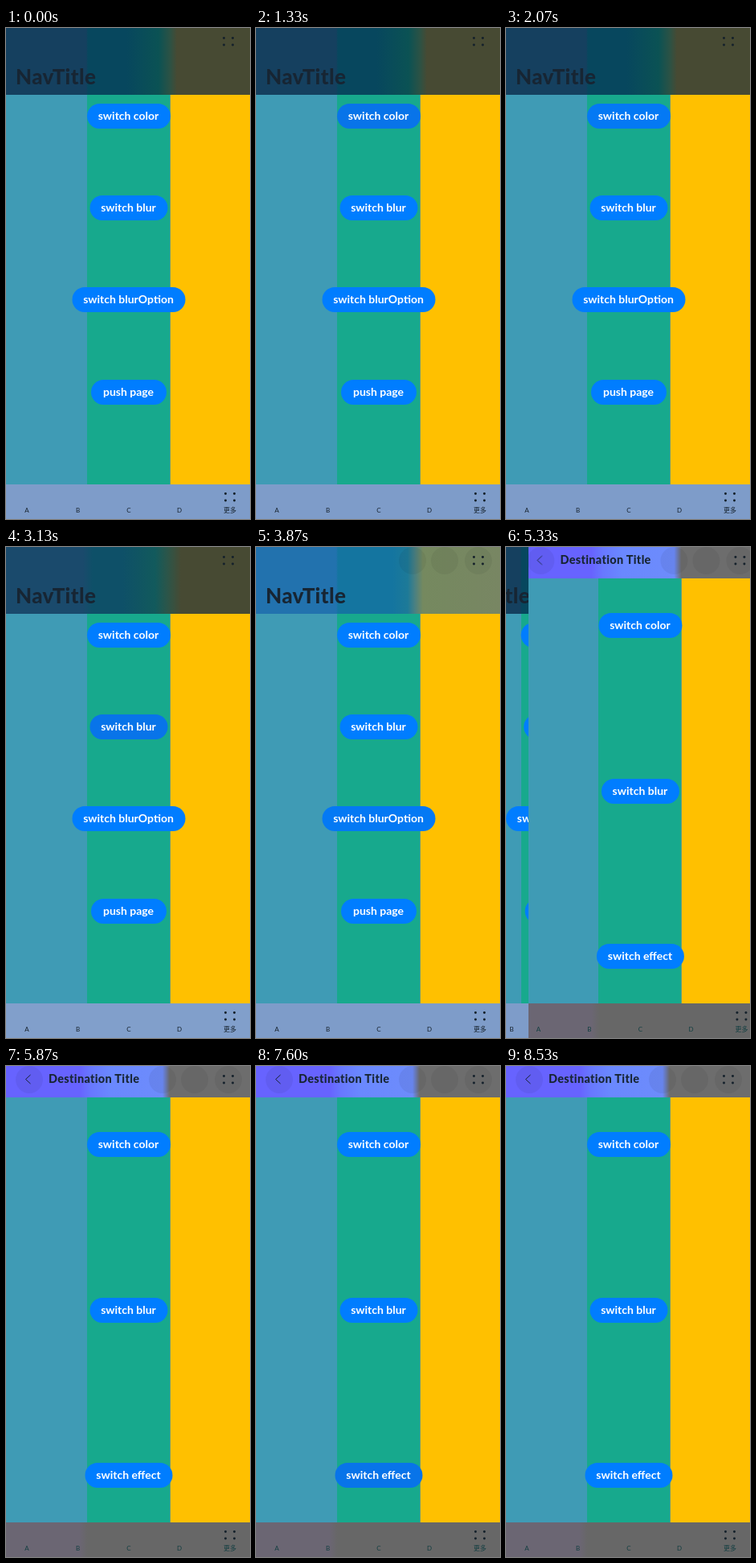
These frames come from a looping animation (304 px wide and 610 px high, 9.6 s). An HTML page:

```html
<!DOCTYPE html>
<html lang="en">
<head>
<meta charset="utf-8">
<title>Navigation bar styles</title>
<style>
html, body { margin: 0; width: 100%; height: 100%; overflow: hidden; }
body { position: relative; font-family: Lato, "Open Sans", sans-serif; }

.stage, .page { position: absolute; left: 0; top: 0; width: 304px; height: 610px; overflow: hidden; }
.stage { --p: 0; animation: slide 9600ms step-end infinite; }
.page { background: linear-gradient(90deg, #3f9bb5 101px, #17a98d 101px 204px, #5e9c86 204px 205px, #ffc000 205px); }
.nav { transform: translateX(calc(var(--p) * -91px)); }
.dest {
  transform: translateX(calc((1 - var(--p)) * 152px));
  clip-path: inset(0 0 0 calc((1 - var(--p)) * 152px));
}

.title, .tools, .layer { position: absolute; left: 0; width: 304px; }
.title { top: 0; height: 83px; }
.dest .title { height: 39px; }
.tools { top: 567px; height: 43px; }
.layer { top: 0; height: 100%; }
.alt { opacity: 0; animation: 9600ms step-end infinite; }

.nav .title { background: linear-gradient(90deg, #15405f 0 100px, #07475e 102px 150px, #0b5254 190px, #2b5245 204px, #474a33 213px); }
.nav .tools { background: #7e9cc9; }
.dest .title { background: linear-gradient(90deg, #6763ff 0 92px, #6878ff 106px, #6a88ff 130px, #6d8cfb 195px, #6d6d6d 204px); }
.dest .tools { background: linear-gradient(90deg, #6b6673 0 92px, #676767 102px); }

.color { animation-name: color; }
.title .color { background: linear-gradient(90deg, #297586 0 100px, #1c7c85 102px 150px, #20877b 190px, #40876c 204px, #5c7f59 213px); }
.tools .color { background: #8ed2f4; }
.blur { animation-name: blur; }
.title .blur { background: linear-gradient(90deg, #1a4a6c 0 96px, #0e5068 108px 145px, #125a5c 186px, #2d5548 202px, #474a33 218px); }
.tools .blur { background: #819fcb; }
.option { animation-name: option; }
.title .option { background: linear-gradient(90deg, #2272ae 0 100px, #1475a0 102px 170px, #1d7a98 189px, #4a8082 198px, #75895f 208px, #788663); }
.tint { animation-name: tint; }
.title .tint { background: linear-gradient(90deg, #6598ff 0 92px, #68a6ff 106px, #6ab2ff 130px, #6db4fb 195px, #6d6d6d 204px); }
.effect { animation-name: effect; }
.title .effect { background: linear-gradient(90deg, #5d86a8 0 98px, #568e9d 102px 180px, #7c8f83 200px, #98906a 212px); }
.tools .effect { background: #7d8084; }

.title b { position: absolute; color: #172533; white-space: nowrap; font-weight: 800; }
.nav b { left: 12px; top: 44px; font-size: 26px; line-height: 32px; letter-spacing: .4px; }
.dest b { left: 53px; top: 6px; font-size: 14.5px; line-height: 20px; letter-spacing: .3px; }

.disc { position: absolute; left: var(--x); top: 17px; width: 34px; height: 34px; margin: -17px; border-radius: 50%; background: rgb(0 0 0 / .055); }
.dots {
  position: absolute; width: 2.8px; height: 2.8px; border-radius: 50%; background: #15212b;
  box-shadow: 11px 0 #15212b, 0 8.5px #15212b, 11px 8.5px #15212b;
}
.title .dots { left: 270px; top: 11.2px; }
.tools .dots { left: 272.2px; top: 9.8px; }
.arrow { position: absolute; left: 0; top: 0; width: 50px; height: 39px; fill: none; stroke: #172533; animation: arrow 9600ms step-end infinite; }

.tools span {
  position: absolute; left: var(--x); top: 26px; width: 40px; margin-left: -20px;
  text-align: center; color: #17232e;
  font: 8px/12px Lato, "Noto Sans CJK SC", "Noto Sans CJK", sans-serif;
}
.dest .tools span { color: #143f42; }

.btn {
  --k: 0;
  position: absolute; left: 152.5px; top: var(--y); width: var(--w); height: 31px;
  transform: translateX(-50%); border-radius: 16px;
  background: rgb(calc(8 * var(--k)) calc(125 - 9 * var(--k)) calc(255 - 22 * var(--k)));
  color: #fff; font-weight: 700; font-size: 14px; line-height: 30px;
  text-align: center; white-space: nowrap;
  animation: 9600ms step-end infinite;
}

/* spring progress of the pushed page, sampled at uneven ticks */
@keyframes slide {
  0% { --p: 0 } 53.43% { --p: .026 } 54.89% { --p: .776 } 55.51% { --p: .905 }
  56.97% { --p: .989 } 57.6% { --p: .996 } 58.33% { --p: .999 } 59.68%, 100% { --p: 1 }
}
@keyframes arrow { 0% { opacity: .8 } 61.14%, 100% { opacity: 1 } }

@keyframes color { 0%, 21.55%, 100% { opacity: 0 } 15.31% { opacity: 1 } }
@keyframes blur { 0%, 33.33%, 100% { opacity: 0 } 27.8% { opacity: 1 } }
@keyframes option { 0%, 46.55%, 100% { opacity: 0 } 40.3% { opacity: 1 } }
@keyframes tint { 0%, 72.18%, 100% { opacity: 0 } 66.66% { opacity: 1 } }
@keyframes effect { 0%, 88.22%, 100% { opacity: 0 } 80.51% { opacity: 1 } }

@keyframes press-color {
  0%, 15.93%, 22.18%, 100% { --k: 0 }
  12.49%, 15.31%, 20.1%, 21.55% { --k: .5 }
  13.85%, 20.83% { --k: 1 }
}
@keyframes press-blur {
  0%, 28.43%, 34.05%, 100% { --k: 0 }
  27.8%, 33.33% { --k: .5 }
  26.35%, 32.6% { --k: 1 }
}
@keyframes press-option {
  0%, 41.66%, 47.91%, 100% { --k: 0 }
  38.22%, 40.3%, 44.47%, 46.55% { --k: .5 }
  38.85%, 45.1% { --k: 1 }
}
@keyframes press-push {
  0%, 54.89%, 100% { --k: 0 }
  51.35% { --k: .5 }
  52.08% { --k: 1 }
}
@keyframes press-tint {
  0%, 67.38%, 73.63%, 100% { --k: 0 }
  64.58%, 66.66%, 72.18% { --k: .5 }
  65.3%, 71.55% { --k: 1 }
}
@keyframes press-effect {
  0%, 81.25%, 88.85%, 100% { --k: 0 }
  78.43%, 80.51%, 86.14%, 88.22% { --k: .5 }
  79.16%, 86.76% { --k: 1 }
}
</style>
</head>
<body>
<div class="stage">
  <div class="page nav">
    <div class="btn" style="--y:93.5px; --w:104px; animation-name:press-color">switch color</div>
    <div class="btn" style="--y:207.5px; --w:97px; animation-name:press-blur">switch blur</div>
    <div class="btn" style="--y:322px; --w:141px; animation-name:press-option">switch blurOption</div>
    <div class="btn" style="--y:436.5px; --w:94px; animation-name:press-push">push page</div>
    <div class="title">
      <div class="layer alt color"></div>
      <div class="layer alt blur"></div>
      <div class="layer alt option">
        <i class="disc" style="--x:195px"></i><i class="disc" style="--x:235px"></i><i class="disc" style="--x:277px"></i>
      </div>
      <b>NavTitle</b><i class="dots"></i>
    </div>
    <div class="tools">
      <div class="layer alt color"></div>
      <div class="layer alt blur"></div>
      <i class="dots"></i>
      <span style="--x:26px">A</span><span style="--x:89.5px">B</span><span style="--x:153px">C</span><span style="--x:216px">D</span><span style="--x:279px">更多</span>
    </div>
  </div>
  <div class="page dest">
    <div class="btn" style="--y:81.5px; --w:104px; animation-name:press-tint">switch color</div>
    <div class="btn" style="--y:287.5px; --w:97px">switch blur</div>
    <div class="btn" style="--y:493px; --w:109px; animation-name:press-effect">switch effect</div>
    <div class="title">
      <div class="layer alt tint"></div>
      <div class="layer alt effect"></div>
      <i class="disc" style="--x:29px"></i><i class="disc" style="--x:195px"></i><i class="disc" style="--x:235px"></i><i class="disc" style="--x:277px"></i>
      <svg class="arrow"><path d="M30.5 11 24.5 16.5 30.5 22"/></svg>
      <b>Destination Title</b><i class="dots"></i>
    </div>
    <div class="tools">
      <div class="layer alt effect"></div>
      <i class="dots"></i>
      <span style="--x:26px">A</span><span style="--x:89.5px">B</span><span style="--x:153px">C</span><span style="--x:216px">D</span><span style="--x:279px">更多</span>
    </div>
  </div>
</div>
</body>
</html>
```
